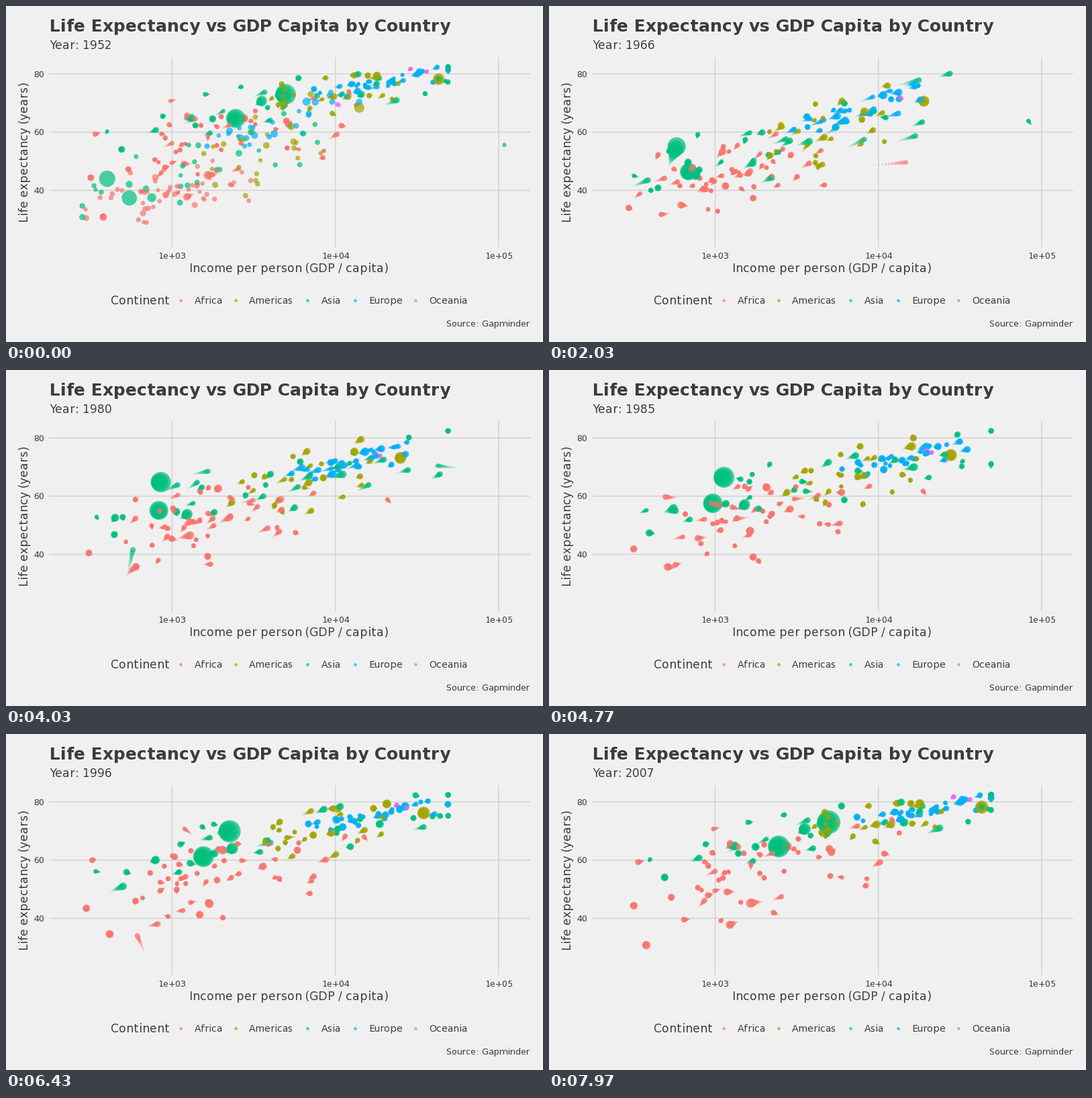
Animation of 800 by 500 pixels, one loop 10000 ms. Source, as a matplotlib script:

```python
import matplotlib.pyplot as plt
import numpy as np
from matplotlib.animation import FuncAnimation
from matplotlib.colors import to_rgb

W, H, DPI = 800, 500, 100
FRAMES, MOVING, WAKE = 300, 240, 12
SURVEYS = np.arange(1952, 2008, 5)
TIME = np.linspace(1952, 2007, MOVING)
INK, PAPER, GRID = "#3c3c3c", "#f0f0f0", "#d2d2d2"

# Trends are given at 1952, 1982 and 2007; income is in powers of ten.
CONTINENTS = {
    "Africa": dict(color="#f8766d", key_x=260, count=50, people=9, young=.26, link=.45,
                   income=(2.99, 3.2, 3.25), income_sd=(.27, .38, .41),
                   life=(39.1, 51.6, 54.8), life_sd=(5, 7, 9)),
    "Americas": dict(color="#a3a500", key_x=341.5, count=24, people=10, young=.45, link=.65,
                     income=(3.49, 3.79, 3.93), income_sd=(.21, .25, .28),
                     life=(53, 66.2, 73.5), life_sd=(9, 6.5, 4.2)),
    "Asia": dict(color="#00bf7d", key_x=449, count=28, people=18, young=.4, link=.75,
                 income=(3.17, 3.62, 3.8), income_sd=(.36, .52, .52),
                 life=(47, 63.5, 71), life_sd=(9, 8, 7.5)),
    "Europe": dict(color="#00b0f6", key_x=519.5, count=30, people=10, young=.8, link=.8,
                   income=(3.69, 4.16, 4.34), income_sd=(.24, .2, .25),
                   life=(64.4, 72.8, 77.6), life_sd=(6, 3, 2.8)),
    "Oceania": dict(color="#e76bf3", key_x=609.5, count=2, people=9, young=.43, link=0,
                    income=(4.01, 4.27, 4.47), income_sd=(.01, .02, .06),
                    life=(69.3, 74.3, 80.7), life_sd=(.2, .4, .5)),
}

# The most recognisable paths: continent, millions of people in 2007,
# then (year, income, life expectancy) at each turn.
LANDMARKS = [
    ("Asia", 1319, [(1952, 400, 44), (1957, 576, 50.5), (1962, 488, 44.5),
                    (1967, 613, 58.4), (1977, 741, 64), (1992, 1656, 68.7),
                    (2007, 4959, 73)]),
    ("Asia", 1110, [(1952, 547, 37.4), (1967, 701, 47.2), (1982, 856, 56.6),
                    (2007, 2452, 64.7)]),
    ("Asia", 224, [(1952, 750, 37.5), (1967, 762, 46), (2007, 3541, 70.7)]),
    ("Asia", 2, [(1952, 108382, 55.6), (1967, 80895, 64.6), (1972, 109348, 67.7),
                 (1982, 31354, 71.3), (2007, 47307, 77.6)]),
    ("Asia", 14, [(1952, 368, 39.4), (1972, 422, 40.3), (1977, 525, 31.2),
                  (1982, 625, 51), (2007, 1714, 59.7)]),
    ("Americas", 301, [(1952, 13990, 68.4), (1967, 19530, 70.8),
                       (2007, 42952, 78.2)]),
    ("Africa", 6, [(1952, 2388, 42.7), (1962, 6757, 47.8), (1967, 18773, 50.2),
                   (1977, 21951, 57.4), (2007, 12057, 74)]),
    ("Africa", 9, [(1952, 493, 40), (1987, 848, 44), (1992, 737, 23.6),
                   (1997, 590, 36.1), (2007, 863, 46.2)]),
]


def px_income(log_income):
    return 247.5 + 243.25 * (log_income - 3)


def px_life(life):
    return 101 + 4.335 * (80 - life)


def trend(values):
    return np.interp(SURVEYS, (1952, 1982, 2007), values)


def drift(rng, count, memory=.985):
    """Standard scores that wander slowly from one survey to the next."""
    score = np.clip(rng.normal(size=count), -2, 2)
    scores = [score]
    for _ in SURVEYS[1:]:
        score = memory * score + np.sqrt(1 - memory ** 2) * rng.normal(size=count)
        scores.append(score)
    return np.array(scores).T


def make_path(years, log_income, life):
    return np.column_stack([px_income(np.interp(TIME, years, log_income)),
                            px_life(np.interp(TIME, years, life))])


def make_radius(people, young):
    return 2.9 + 14.5 * np.sqrt(people * np.linspace(young, 1, MOVING) / 1319)


def build_bubbles():
    rng = np.random.default_rng(12)
    bubbles = []
    for c in CONTINENTS.values():
        wealth, luck = drift(rng, c["count"]), drift(rng, c["count"])
        health = c["link"] * wealth + np.sqrt(1 - c["link"] ** 2) * luck
        incomes = trend(c["income"]) + trend(c["income_sd"]) * wealth
        lives = trend(c["life"]) + trend(c["life_sd"]) * health
        people = np.clip(c["people"] * np.exp(rng.normal(0, 1.1, c["count"])), .3, 150)
        for income, life, crowd in zip(incomes, lives, people):
            bubbles.append((make_path(SURVEYS, np.clip(income, 2.44, 4.69),
                                      np.clip(life, 29, 82.4)),
                            make_radius(crowd, c["young"]), to_rgb(c["color"])))
    for continent, people, stops in LANDMARKS:
        c = CONTINENTS[continent]
        years, income, life = np.array(stops).T
        bubbles.append((make_path(years, np.log10(income), life),
                        make_radius(people, c["young"]), to_rgb(c["color"])))
    order = rng.permutation(len(bubbles))
    xy, radius, colors = zip(*(bubbles[i] for i in order))
    return np.stack(xy, 1), np.stack(radius, 1), np.array(colors)


def area(radius):
    return (2 * np.asarray(radius) * 72 / DPI) ** 2


XY, RADIUS, COLORS = build_bubbles()

# Whole-pixel glyph advances
plt.rcParams.update({"font.family": "DejaVu Sans", "text.hinting_factor": 1})
fig = plt.figure(figsize=(W / DPI, H / DPI), dpi=DPI, facecolor=PAPER)
ax = fig.add_axes([0, 0, 1, 1])
ax.set(xlim=(0, W), ylim=(H, 0))
ax.axis("off")


def label(x, y, text, size, **style):
    return ax.text(x, y, text, fontsize=size * 72 / DPI, color=INK,
                   **{"va": "baseline", **style})


def grid_line(x, y):
    ax.plot(x, y, color=GRID, lw=1.07, zorder=1, snap=False)


for life in (40, 60, 80):
    y = px_life(life)
    grid_line([65, 780], [y, y])
    label(57.5, y + 4.7, str(life), 13, ha="right")
for power in (3, 4, 5):
    x = px_income(power)
    grid_line([x, x], [77, 358.5])
    label(x, 376, f"1e+0{power}", 13, ha="center")

label(65, 38, "Life Expectancy vs GDP Capita by Country", 25, weight="bold")
year_label = label(65, 64, "", 17)
label(421.5, 396, "Income per person (GDP / capita)", 17, ha="center")
label(33, 217.5, "Life expectancy (years)", 17, ha="center",
      rotation=90, rotation_mode="anchor")
label(156, 444, "Continent", 17)
label(780.5, 477, "Source: Gapminder", 13, ha="right")
for name, c in CONTINENTS.items():
    ax.scatter(c["key_x"], 438, s=area(2.3), color=c["color"], alpha=.7, lw=0)
    label(c["key_x"] + 20.7, 443, name, 14)

bubbles = ax.scatter([], [], lw=0, zorder=3)


def update(frame):
    now = min(frame, MOVING - 1)
    ages = np.arange(WAKE - 1, -1, -1)
    past = (now - ages) % MOVING
    strength = 1 - ages / WAKE
    radius = .7 + (RADIUS[past] - .7) * strength[:, None] ** 1.5
    alpha = np.repeat(.7 * strength, len(COLORS))
    bubbles.set_offsets(XY[past].reshape(-1, 2))
    bubbles.set_sizes(area(radius).ravel())
    bubbles.set_facecolors(np.column_stack([np.tile(COLORS, (WAKE, 1)), alpha]))
    year_label.set_text(f"Year: {round(TIME[now])}")
    return bubbles, year_label


anim = FuncAnimation(fig, update, frames=FRAMES, interval=10000 / FRAMES,
                     repeat=True, repeat_delay=0)
plt.show()
```
